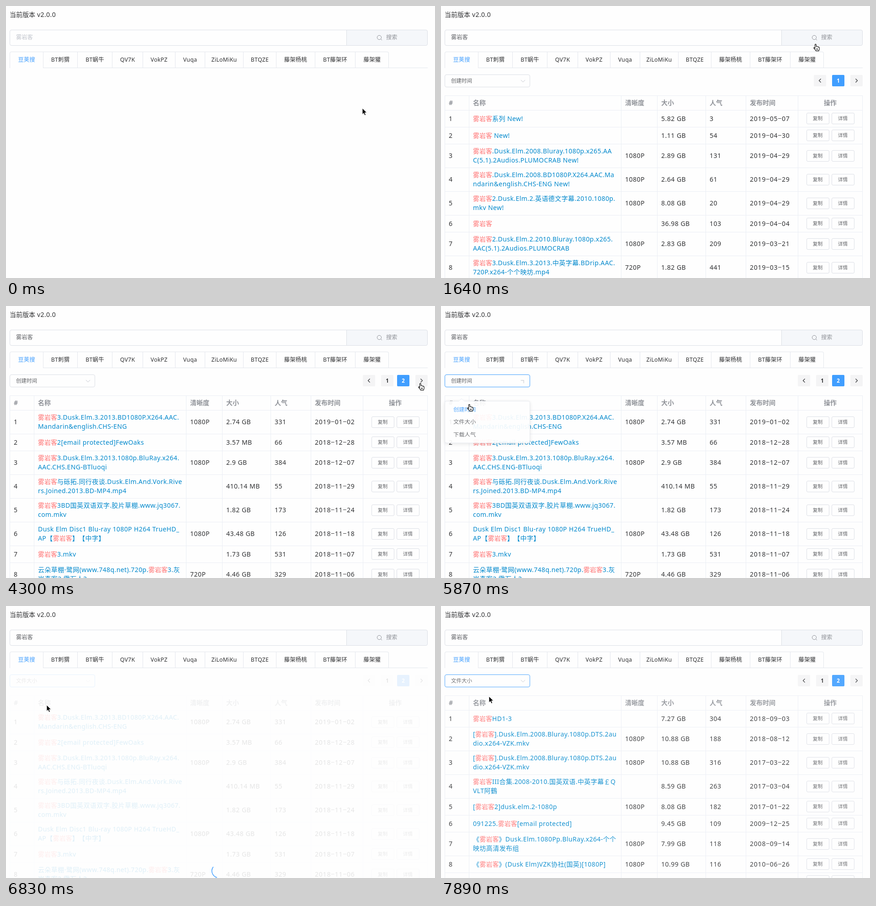
Write an HTML page that moves like this. It is 939 px wide and 596 px high and loops after 8000 ms.

```html
<!DOCTYPE html>
<html lang="zh-CN">
<head>
<meta charset="utf-8">
<title>搜索</title>
<style>
html, body { margin: 0; width: 100%; height: 100%; overflow: hidden; background: #fefefe; }
body { position: relative; color: #303133; font: 12.3px/20px "Noto Sans", "Noto Sans CJK SC", "Noto Sans CJK", sans-serif; white-space: nowrap; text-spacing-trim: space-all; }
* { box-sizing: border-box; }
#stage > *, #tabs > *, .pager > * { position: absolute; }
#stage { position: absolute; width: 939px; height: 596px; overflow: hidden; }
#title { left: 8px; top: 9px; font-size: 14px; letter-spacing: .4px; }
#title span { letter-spacing: 0; }
#query { left: 8px; top: 52px; width: 738px; height: 35px; border: 1px solid #dcdfe6; border-radius: 4px 0 0 4px; padding: 6px 13px; color: #c0c4cc; }
#query.filled { color: #606266; }
#search { left: 745px; top: 52px; width: 178px; height: 35px; border: 1px solid #dcdfe6; border-radius: 0 4px 4px 0; background: #f5f7fa; color: #909399; padding: 6px 0 0 86px; }
#search svg { position: absolute; left: 65px; top: 10px; }
#tabs { left: 8px; top: 100px; width: 830px; height: 36px; border: 1px solid #e4e7ed; border-bottom: 0; border-radius: 4px 4px 0 0; }
#tabs div { top: 0; height: 35px; padding-top: 7px; text-align: center; letter-spacing: .3px; border: 0 solid #e4e7ed; border-width: 0 1px 1px 0; }
#tabs div:first-child { color: #409eff; border-bottom: 0; letter-spacing: 0; }
#tabs div:last-child { border-right: 0; }
#rule { left: 838px; top: 135px; width: 85px; height: 1px; background: #e4e7ed; }
#select { left: 8px; top: 150px; width: 187px; height: 28px; border: 1px solid #dcdfe6; border-radius: 4px; padding: 3px 13px; font-size: 11.5px; color: #606266; }
#select.focus { border-color: #409eff; }
#select svg { position: absolute; left: 165px; top: 8px; }
.pager { left: 0; top: 151px; font-weight: bold; font-size: 11.5px; text-align: center; }
.pager div { width: 27px; height: 25px; line-height: 25px; border-radius: 2px; background: #f4f4f5; }
.pager .on { background: #409eff; color: #fff; }
.pager svg { display: block; margin: 7px 8px; }
.sheet { left: 8px; top: 196px; display: grid; grid-template-columns: 53px 333px 79px 106px 88px 114px 141px; border: 0 solid #ebeef5; border-width: 1px 0 0 1px; font-size: 14px; letter-spacing: .5px; }
.sheet > div { display: flex; align-items: center; min-height: 36px; padding: 5px 8px 6px; border: 0 solid #ebeef5; border-width: 0 1px 1px 0; }
.sheet > .head { min-height: 32px; height: 32px; color: #909399; font-weight: bold; letter-spacing: 0; }
.sheet .name { color: #08c; letter-spacing: .42px; }
.sheet .name b { color: #ff7373; font-weight: normal; letter-spacing: 0; }
.sheet .date { letter-spacing: .8px; }
.sheet .ops { justify-content: center; gap: 5px; }
.ops i { flex: none; width: 50px; height: 25px; border: 1px solid #dcdfe6; border-radius: 3px; font: normal 10.7px/22px "Noto Sans CJK SC", "Noto Sans CJK", sans-serif; letter-spacing: 0; text-align: center; color: #606266; }
#mask { left: 8px; top: 150px; width: 916px; height: 446px; background: #fefefe; }
#menu { left: 8px; top: 208px; width: 187px; height: 101px; padding-top: 5px; border: 1px solid #e4e7ed; border-radius: 4px; background: #fff; box-shadow: 0 2px 10px rgba(0,0,0,.1); transform-origin: top; color: #606266; }
#menu::before { content: ""; position: absolute; left: 31px; top: -5px; width: 9px; height: 9px; background: #fff; border: 1px solid #ebeef5; border-width: 1px 0 0 1px; transform: rotate(45deg); }
#menu div { height: 30px; line-height: 30px; padding-left: 18px; }
#menu .on { color: #409eff; }
#menu .hover { background: #f5f7fa; }
#spinner { left: 447px; top: 562px; }
#arrow, #hand { left: 0; top: 0; overflow: visible; }
</style>
</head>
<body>
<div id="stage">
  <div id="title"><span>当前版本</span> v2.0.0</div>
  <div id="query">雾岩客</div>
  <div id="search"><svg width="14" height="14" fill="none" stroke="#909399"><circle cx="6" cy="6" r="4.6"/><path d="M9.3 9.3L12 12"/></svg>搜索</div>
  <div id="tabs"></div>
  <div id="rule"></div>
  <div id="select"><span></span><svg width="11" height="11" fill="none" stroke="#c0c4cc"><path d="M1 3.2L5.5 7.7L10 3.2"/></svg></div>
  <div id="mask"></div>
  <svg id="spinner" width="37" height="37" viewBox="0 0 50 50" fill="none" stroke="#409eff" stroke-width="2" stroke-linecap="round"><circle cx="25" cy="25" r="20"/></svg>
  <div id="menu"><div>创建时间</div><div>文件大小</div><div>下载人气</div></div>
  <svg id="arrow" width="12" height="18"><path d="M0 0V13.6L3.1 10.7L5.1 15.6L7.5 14.6L5.5 9.8H9.7Z" stroke="#fff" stroke-width=".9"/></svg>
  <svg id="hand" width="15" height="17"><path d="M3.6 9.6V2C3.6.2 6.2.2 6.2 2V6.2C6.4 5 8.6 5.2 8.6 6.6C9 5.6 11 5.8 11 7.2C11.5 6.6 13.2 6.8 13.2 8.2V11C13.2 13 12 13.5 12 15.4H5.6C5.4 13.6 1 10.2 .8 8.8C.8 7.4 2.4 7.6 3.6 9.6Z M7.2 10V13M9.3 10V13" fill="#fff" stroke="#000" stroke-width="1.1"/></svg>
</div>
<script>
const $ = id => document.getElementById(id);
const LOOP = 8000;

// name ; quality ; size ; popularity ; date   (~ keyword, | line break)
const sheetData = [
`~系列 New!;;5.82 GB;3;2019-05-07
~ New!;;1.11 GB;54;2019-04-30
~.Dusk.Elm.2008.Bluray.1080p.x265.AA|C(5.1).2Audios.PLUMOCRAB New!;1080P;2.89 GB;131;2019-04-29
~.Dusk.Elm.2008.BD1080P.X264.AAC.Ma|ndarin&english.CHS-ENG New!;1080P;2.64 GB;61;2019-04-29
~2.Dusk.Elm.2.英语德文字幕.2010.1080p.|mkv New!;1080P;8.08 GB;20;2019-04-29
~;;36.98 GB;103;2019-04-04
~2.Dusk.Elm.2.2010.Bluray.1080p.x265.|AAC(5.1).2Audios.PLUMOCRAB;1080P;2.83 GB;209;2019-03-21
~3.Dusk.Elm.3.2013.中英字幕.BDrip.AAC.|720P.x264-个个映坊.mp4;720P;1.82 GB;441;2019-03-15`,
`~3.Dusk.Elm.3.2013.BD1080P.X264.AAC.|Mandarin&english.CHS-ENG;1080P;2.74 GB;331;2019-01-02
~2[email protected]FewOaks;;3.57 MB;66;2018-12-28
~3.Dusk.Elm.3.2013.1080p.BluRay.x264.|AAC.CHS.ENG-BTluoqi;1080P;2.9 GB;384;2018-12-07
~与砾拓.同行夜谈.Dusk.Elm.And.Vork.Rive|rs.Joined.2013.BD-MP4.mp4;;410.14 MB;55;2018-11-29
~3BD国英双语双字.胶片草棚.www.jq3067.|com.mkv;;1.82 GB;173;2018-11-24
Dusk Elm Disc1 Blu-ray 1080P H264 TrueHD_|AP【~】【中字】;1080P;43.48 GB;126;2018-11-18
~3.mkv;;1.73 GB;531;2018-11-07
云朵草棚·鹭网(www.748q.net).720p.~3.灰|岩奇客3.雾石人3;720P;4.46 GB;329;2018-11-06`,
`~HD1-3;;7.27 GB;304;2018-09-03
[~].Dusk.Elm.2008.Bluray.1080p.DTS.2au|dio.x264-VZK.mkv;1080P;10.88 GB;188;2018-08-12
[~].Dusk.Elm.2008.Bluray.1080p.DTS.2au|dio.x264-VZK.mkv;1080P;10.88 GB;316;2017-03-22
~III合集.2008-2010.国英双语.中英字幕￡Q|VLT阿鶴;;8.59 GB;263;2017-03-04
[~2]dusk.elm.2-1080p;1080P;8.08 GB;182;2017-01-22
091225.~[email protected];;9.45 GB;109;2009-12-25
《~》Dusk.Elm.1080Pp.BluRay.x264-个个|映坊高清发布组;1080P;7.99 GB;118;2008-09-14
《~》(Dusk Elm)VZK协社(国英)[1080P];1080P;10.99 GB;116;2010-06-26
~[email protected];;8.76 GB;97;2013-09-06`];

const insert = (cls, html) => {
  const el = document.createElement('div');
  el.className = cls;
  el.innerHTML = html;
  $('stage').insertBefore(el, $('mask'));
  return el;
};

const header = ['#', '名称', '清晰度', '大小', '人气', '发布时间', '操作']
  .map((h, i) => `<div class="head${i == 6 ? ' ops' : ''}">${h}</div>`).join('');
const sheets = sheetData.map(text => insert('sheet', header + text.split('\n').map((line, i) => {
  const [name, quality, size, heat, date] = line.split(';');
  const title = name.replace('&', '&amp;').replace(/~/g, '<b>雾岩客</b>').replace('|', '<br>');
  return `<div>${i + 1}</div><div class="name"><span>${title}</span></div><div>${quality}</div><div>${size}</div>
    <div>${heat}</div><div class="date">${date.replace(/-/g, '−')}</div><div class="ops"><i>复制</i><i>详情</i></div>`;
}).join('')));

const chevron = d => `<svg width="11" height="11" fill="none" stroke="#303133" stroke-width="1.2"><path d="${d}"/></svg>`;
const pagers = [1, 2].map(count => {
  const labels = [chevron('M7.5 1.5L3.5 5.5L7.5 9.5'), 1, 2].slice(0, count + 1).concat(chevron('M3.5 1.5L7.5 5.5L3.5 9.5'));
  const lefts = [781, 821, 856, 896].slice(2 - count);
  if (count == 1) lefts[0] = 816;
  return insert('pager', labels.map((l, i) =>
    `<div class="${i == count ? 'on' : ''}" style="left:${lefts[i]}px">${l}</div>`).join(''));
});

const edges = [8, 81, 156, 232, 299, 370, 435, 519, 591, 676, 764, 837];
$('tabs').innerHTML = ['豆荚搜', 'BT刺猬', 'BT蜗牛', 'QV7K', 'VokPZ', 'Vuqa', 'ZiLoMiKu', 'BTQZE', '藤架杨桃', 'BT藤架环', '藤架獾']
  .map((tab, i) => `<div style="left:${edges[i] - 8}px;width:${edges[i + 1] - edges[i]}px">${tab}</div>`).join('');

// The screen refreshes in bursts: [first, last, count]
const ticks = [[0], [180], [320, 680, 5], [1040], [1640], [1780, 2400, 8], [2610, 2690, 2], [2990], [3220, 3310, 2],
  [4300, 4480, 3], [5100, 5400, 4], [5550, 5870, 4], [6020, 6230, 3], [6560, 6680, 2], [6830], [7010], [7160], [7300, 7890, 7]]
  .flatMap(([a, b, n = 1]) => Array.from({ length: n }, (_, i) => n == 1 ? a : Math.round(a + (b - a) * i / (n - 1))));

// Pointer path: time, x, y, 1 for the hand
const path = [[0, 780, 224], [180, 777, 219], [500, 824, 34], [680, 811, 75, 1], [1040, 811, 75, 1], [1640, 815, 83, 1],
  [2200, 918, 176, 0], [2400, 902, 165, 1], [2610, 902, 165, 1], [2690, 904, 164, 0], [2990, 901, 165, 1], [3220, 904, 164, 0],
  [3310, 901, 164, 1], [4300, 902, 169, 1], [4390, 928, 338, 0], [4480, 960, 450, 0], [5100, 877, 574, 0], [5400, 3, 198, 0],
  [5550, 40, 166, 1], [5763, 52, 170, 1], [5870, 57, 215, 1], [6230, 66, 251, 1], [6560, 68, 250, 1], [6830, 89, 217, 0],
  [7010, 92, 201, 0], [7890, 105, 198, 0], [LOOP, 105, 198, 0]];

const ramp = (t, a, b) => Math.min(1, Math.max(0, (t - a) / (b - a)));
const smooth = p => p * p * (3 - 2 * p);
const show = (el, on) => el.style.display = on ? '' : 'none';

function drawPointer(t) {
  const i = path.findIndex((key, k) => t >= key[0] && t < path[k + 1][0]);
  const [a, x, y, hand] = path[i], [b, x2, y2] = path[i + 1];
  const p = ramp(t, a, b);
  const el = $(hand ? 'hand' : 'arrow');
  show($('hand'), hand);
  show($('arrow'), !hand);
  el.style.transform = `translate(${x + (x2 - x) * p}px,${y + (y2 - y) * p}px)`;
}

function drawSpinner(t) {
  const age = t - 6500, p = age / 1500 % 1;
  const grow = smooth(ramp(p, 0, .5)), slide = smooth(ramp(p, .5, 1));
  const spinner = $('spinner');
  show(spinner, t >= 6560 && t < 7680);
  spinner.style.transform = `rotate(${age * .18}deg)`;
  spinner.style.opacity = ramp(t, 6500, 6800);
  spinner.style.strokeDasharray = `${1 + 89 * grow} 150`;
  spinner.style.strokeDashoffset = -40 * grow - 80 * slide;
}

function draw(t) {
  const loaded = t >= 1040;
  const sheet = !loaded ? -1 : t < 2610 ? 0 : t < 7600 ? 1 : 2;
  const page = !loaded ? -1 : t < 2400 ? 0 : 1;
  const sorted = t >= 6560;
  $('query').className = loaded ? 'filled' : '';
  sheets.forEach((el, i) => show(el, i == sheet));
  pagers.forEach((el, i) => show(el, i == page));

  const select = $('select');
  show(select, loaded);
  select.className = t >= 5600 ? 'focus' : '';
  select.firstChild.textContent = sorted ? '文件大小' : '创建时间';
  const turn = ramp(t, 5650, 5943) - ramp(t, 6500, 6800);
  select.lastChild.style.transform = `rotate(${-180 * turn}deg)`;

  const menu = $('menu'), open = ramp(t, 5650, 5890) - ramp(t, 6500, 6680);
  show(menu, open > 0);
  menu.style.opacity = open;
  menu.style.transform = `scaleY(${open})`;
  [...menu.children].forEach((item, i) =>
    item.className = (i == +sorted ? 'on ' : '') + (i == 1 && t >= 6230 ? 'hover' : ''));

  const busy = t >= 2610 && t < 2690 ? .5 : .88 * (ramp(t, 6500, 6830) - ramp(t, 7650, 7920));
  $('mask').style.opacity = busy;
  drawSpinner(t);
  drawPointer(t);
}

let last = -1;
function frame(now) {
  const t = ticks.filter(tick => tick <= now % LOOP).pop();
  if (t !== last) draw(last = t);
  requestAnimationFrame(frame);
}
frame(0);
</script>
</body>
</html>
```
